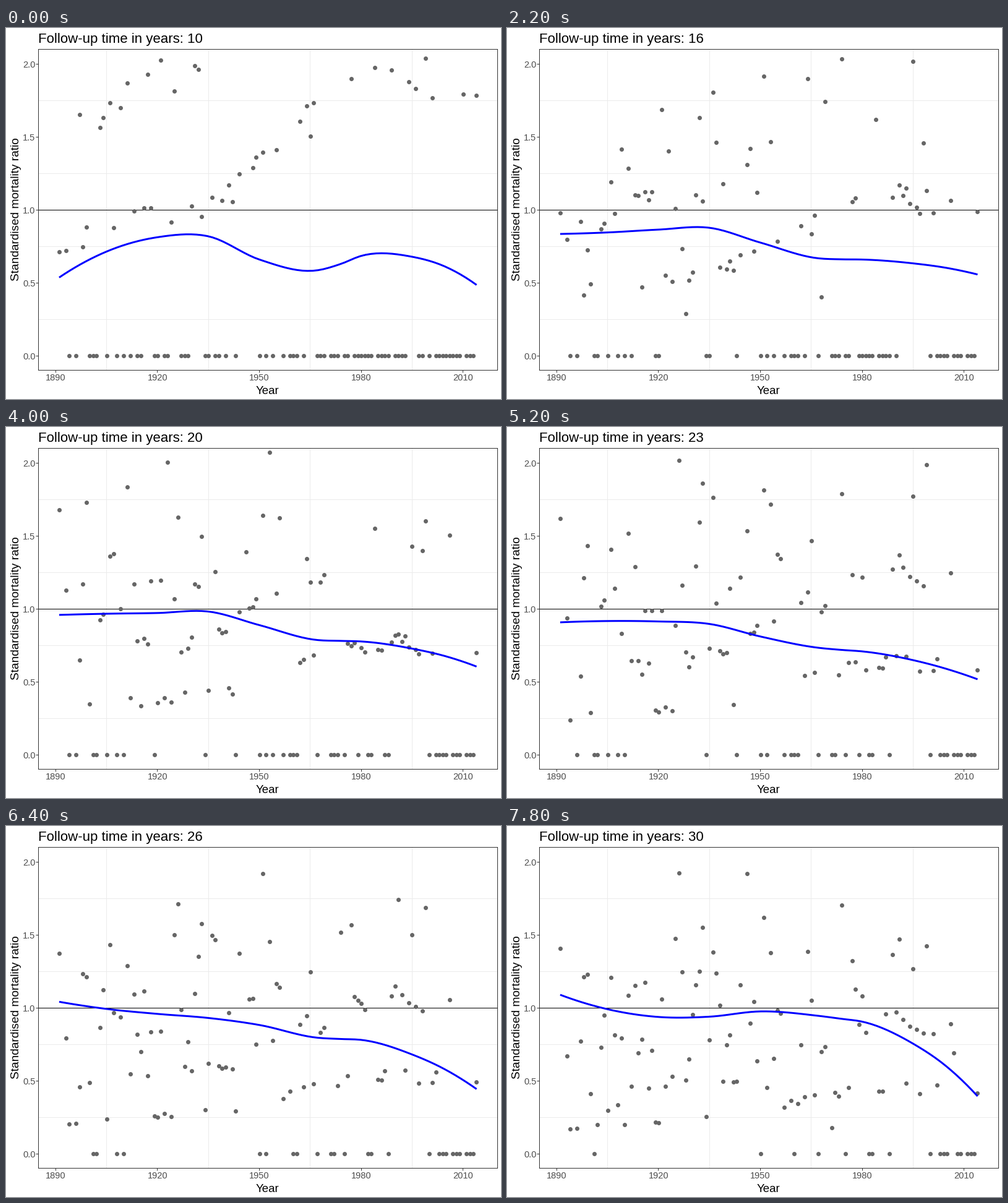
Animation, 800 px wide and 600 px high, one loop 8000 ms. Source, as a matplotlib script:

```python
import numpy as np
import matplotlib.pyplot as plt
from matplotlib.animation import FuncAnimation
from matplotlib.transforms import Affine2D

W, H, DPI = 800, 600, 100
PT = 72 / DPI                                  # points per pixel
LEFT, RIGHT, TOP, BOTTOM = 52, 794, 33, 552    # pixel rows and columns
X_MIN, X_MAX = 1884.9, 2020.2
ZERO_ROW, UNIT = 529, 236                      # row of 0.0, pixels per 1.0
FRAMES, INTERVAL = 40, 200
START_AGE, END_AGE = 10, 30
plt.rcParams["font.family"] = "Liberation Sans"

# Smoothed trend: heights at a few years for a few follow-up times
KNOTS = np.array([1891, 1905, 1920, 1935, 1950, 1967, 1974, 1980, 1995, 2005,
                  2014])
TREND = {
    10: [.534, .712, .810, .816, .657, .583, .627, .682, .676, .606, .483],
    13: [.689, .746, .801, .829, .712, .634, .644, .657, .653, .627, .583],
    17.5: [.947, .920, .911, .911, .822, .691, .670, .657, .613, .577, .532],
    20: [.956, .964, .969, .979, .886, .784, .778, .774, .725, .672, .602],
    23: [.905, .914, .911, .894, .808, .731, .716, .706, .646, .585, .515],
    26: [1.039, .990, .956, .928, .880, .793, .784, .778, .678, .572, .441],
    29.5: [1.087, .988, .935, .937, .973, .943, .922, .903, .752, .593, .392],
}
ages = np.array(list(TREND))
heights = np.array(list(TREND.values()))


def hermite(x, y, xs):
    m = np.gradient(y, x, edge_order=2)
    i = np.clip(np.searchsorted(x, xs, side="right") - 1, 0, len(x) - 2)
    h = x[i + 1] - x[i]
    s = (xs - x[i]) / h
    return ((1 + 2 * s) * (1 - s) ** 2 * y[i] + s * (1 - s) ** 2 * h * m[i]
            + s * s * (3 - 2 * s) * y[i + 1] + s * s * (s - 1) * h * m[i + 1])


def trend(t, xs):
    row = np.array([np.interp(t, ages, col) for col in heights.T])
    return hermite(KNOTS, row, xs)


# Each birth year is a small cohort whose deaths arrive at random, while the
# expected number of deaths grows smoothly with the follow-up time.
rng = np.random.default_rng(12)
years = np.arange(1891, 2015)
one_death = np.interp(years, [1891, 1907, 1940, 1965, 1985, 2014],
                      [.17, .20, .24, .36, .45, .43])
one_death *= rng.uniform(0.9, 1.1, years.size)
risk = trend(20, years) * rng.gamma(4, 1 / 4, years.size)
arrivals = rng.exponential(size=(years.size, 60)).cumsum(axis=1)


def ratios(age):
    expected = (age / END_AGE) ** 1.35 / one_death
    deaths = (arrivals < (risk * expected)[:, None]).sum(axis=1)
    return deaths / expected


table = np.array([ratios(a) for a in range(START_AGE, END_AGE + 1)])
trend_x = np.linspace(years[0], years[-1], 80)

fig = plt.figure(figsize=(W / DPI, H / DPI), dpi=DPI, facecolor="white")
ax = fig.add_axes([LEFT / W, (H - 1 - BOTTOM) / H, (RIGHT - LEFT) / W,
                   (BOTTOM - TOP) / H])
ax.set_xlim(X_MIN, X_MAX)
ax.set_ylim((ZERO_ROW - BOTTOM) / UNIT, (ZERO_ROW - TOP) / UNIT)


def label(x, y, text, size, color="black", **kw):
    return fig.text(x / W, 1 - y / H, text, fontsize=size * PT, color=color,
                    va="baseline", **kw)


x_ticks = np.arange(1890, 2011, 30)
y_ticks = np.arange(0, 2.1, 0.5)
ax.set_xticks(x_ticks, [])
ax.set_yticks(y_ticks, [])
ax.tick_params(length=4 * PT, width=PT, color="#333333")
for spine in ax.spines.values():
    spine.set(linewidth=PT, color="#333333", zorder=6)

for x in x_ticks[:-1] + 15:
    ax.axvline(x, color="#EBEBEB", lw=PT, zorder=1)
for y in y_ticks[:-1] + 0.25:
    ax.axhline(y, color="#EBEBEB", lw=PT, zorder=1)
ax.axhline(1, color="black", lw=PT, zorder=2)

for x in x_ticks:
    col = LEFT + (x - X_MIN) / (X_MAX - X_MIN) * (RIGHT - LEFT)
    label(col + 0.5, 570.5, str(x), 14.6, "#4D4D4D", ha="center")
for y in y_ticks:
    label(47.5, ZERO_ROW - UNIT * y + 7, f"{y:.1f}", 14.6, "#4D4D4D",
          ha="right")

label(422.5, 591.5, "Year", 18.7, ha="center")
label(21.5, 293, "Standardised mortality ratio", 19.2, rotation=90,
      ha="center", rotation_mode="anchor")
title = label(51.5, 24, "", 22.3, ha="left")

# Dots and curve sit on pixel centres
centred = ax.transData + Affine2D().translate(0.5, 0.5)
dots = ax.scatter(years, table[0], s=(7 * PT) ** 2, color="#666666",
                  linewidths=0, zorder=3)
dots.set_offset_transform(centred)
curve, = ax.plot(trend_x, trend(START_AGE, trend_x), color="#0000FF",
                 lw=3 * PT, zorder=4, solid_capstyle="butt",
                 solid_joinstyle="round", transform=centred)


def draw(i):
    t = START_AGE + i / 2
    k, mix = i // 2, i % 2 / 2
    values = table[k] * (1 - mix) + table[k + 1] * mix
    dots.set_offsets(np.column_stack([years, values]))
    curve.set_ydata(trend(t, trend_x))
    title.set_text(f"Follow-up time in years: {int(t + 0.5)}")
    return dots, curve, title


anim = FuncAnimation(fig, draw, frames=FRAMES, interval=INTERVAL,
                     repeat=True, repeat_delay=0, blit=False)
plt.show()
```
